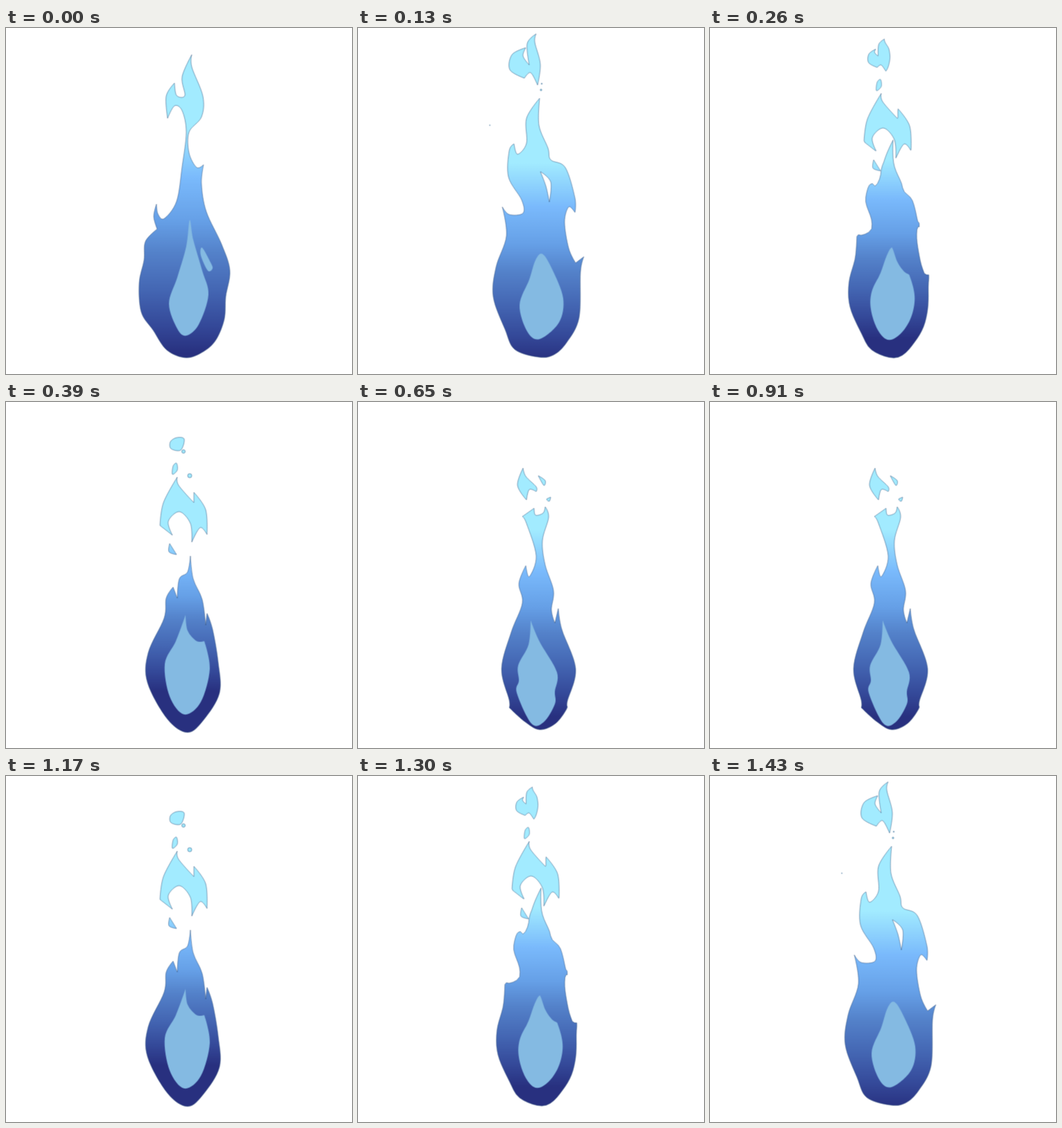
Recreate the animation shown at these times as an HTML page. Size 500 px wide and 500 px high, loop 1560 ms.

```html
<!DOCTYPE html>
<html lang="en">
<head>
<meta charset="utf-8">
<title>Blue flame</title>
<style>
html, body { margin: 0; width: 100%; height: 100%; overflow: hidden; background: #fff; }
svg { display: block; width: 100vw; height: 100vh; }
g { opacity: 0; }
.fire { stroke: #1c3f6e; stroke-width: .8; stroke-opacity: .6; }
.hole { fill: #fff; }
.core { fill: #84bae2; }
</style>
</head>
<body>
<svg viewBox="-.5 -.5 500 500"></svg>
<script>
const STEP = 130;
const LIFT = 14;      // loose pieces rise between key poses
const SAMPLES = 120;  // points per blended outline
const COLORS = {
  0: '#a2ebff', .22: '#7abafc', .41: '#66a0e7', .55: '#5482ca', .72: '#4466b3', .87: '#354a9a', 1: '#28307f'
};

// Key points of smooth closed curves, tip first; "!" is a sharp corner, "|" starts a new outline.
const KEYS = [
  {
    shade: [145, 470],
    body: `268,38! 268,56 284,98 282,128 264,150 264,180 275,201 285,197! 282,225 289,265 311,312 323,350 317,388
      315,420 303,450 285,467 260,476 232,465 212,436 195,410 192,368 199,335 201,308 218,290! 213,272 217,254!
      219,268 228,275 246,250 254,200 260,150 254,119 243,112 233,130! 231,98 243,79! 246,97 258,97 254,70`,
    core: `265,277 270,305 283,350 292,385 278,428 260,444 247,434 235,398 247,360 260,315
      | 283,317 295,338 298,347 291,350 281,328`
  },
  {
    shade: [195, 480],
    body: `262,101! 261,140 274,173 278,190 299,201 313,245 313,266! 304,258 298,280 304,318 314,339! 326,330!
      321,352 319,418 301,454 282,472 260,475 226,464 212,435 195,388 199,345 214,300 208,258! 218,269 238,267
      236,248 217,215 218,177 225,167! 230,182 243,166 243,130`,
    hole: '263,207! 278,222 276,251! 271,228',
    bits: '257,8! 255,20 263,52 259,82! 249,64 240,72! 219,60 222,38 242,28! 238,40 247,53! 244,22',
    core: '266,326 280,348 296,390 290,425 262,449 244,438 233,400 247,363 256,335',
    sparks: [[264, 89, 1.2], [265, 80, .8], [190, 140, .5]]
  },
  {
    shade: [185, 418],
    body: `266,222! 270,255 283,285 288,322! 290,305! 298,328 306,375 308,420 285,459 262,477 233,458 204,405
      205,362 228,312 231,283 241,267! 247,283! 250,255 262,245`,
    bits: `246,51 257,53 252,69 238,67 237,57
      | 247,108! 249,120 271,145! 271,130! 288,155 290,191! 280,181 268,202! 266,175 250,158 234,172 240,192!
        222,178! 227,145
      | 236,204! 246,220! 235,216 | 246,88 247,98 240,104 241,92`,
    core: '259,307! 262,330 275,345 286,345! 294,385 281,433 257,451 236,425 229,378 245,345',
    sparks: [[256, 71, 2.5], [265, 106, 3]]
  },
  {
    shade: [185, 455],
    body: `270,151! 275,166 266,200 270,235 282,272 279,300 284,319! 289,298! 294,328 314,385 302,432 301,443
      285,464 262,473 240,461 218,441! 218,430 207,385 221,332 237,290 232,262 242,236! 247,252 257,222 243,175
      237,165! 254,153! 256,163 267,160`,
    bits: `260,106! 270,113 268,120 | 238,95! 242,107 257,122 257,129! 247,126 243,141! 230,120
      | 272,140 278,137! 276,143`,
    core: '249,315! 262,346 287,390 284,418 284,436 268,462 250,464 229,420 232,402 231,380 246,350'
  }
];

const svg = document.querySelector('svg');
const make = tag => document.createElementNS('http://www.w3.org/2000/svg', tag);

function add(parent, tag, attrs = {}) {
  const el = make(tag);
  for (const key in attrs) el.setAttribute(key, attrs[key]);
  return parent.appendChild(el);
}

function curve(text) {
  const pts = text.trim().split(/\s+/).map(word => {
    const [x, y] = word.replace('!', '').split(',').map(Number);
    return { x, y, sharp: word.endsWith('!') };
  });
  const n = pts.length;
  const handle = (i, sign) => {
    const p = pts[i], a = pts[(i + n - 1) % n], b = pts[(i + 1) % n];
    const k = p.sharp ? 0 : sign / 6;
    return `${p.x + k * (b.x - a.x)},${p.y + k * (b.y - a.y)}`;
  };
  const arcs = pts.map((p, i) => {
    const j = (i + 1) % n;
    return `C${handle(i, 1)} ${handle(j, -1)} ${pts[j].x},${pts[j].y}`;
  });
  return `M${pts[0].x},${pts[0].y}${arcs.join('')}Z`;
}

const curves = text => text ? text.split('|').map(curve) : [];

const build = key => ({
  shade: key.shade,
  body: curves(key.body),
  hole: curves(key.hole),
  bits: curves(key.bits),
  core: curves(key.core),
  sparks: key.sparks || []
});

// Evenly spaced points from the tip down to the lowest point, then back up to the tip.
function trace(d) {
  const path = make('path');
  path.setAttribute('d', d);
  const total = path.getTotalLength();
  const at = s => path.getPointAtLength(s * total);
  let low = 0;
  for (let s = 0; s < 1; s += .005) if (at(s).y > at(low).y) low = s;
  return Array.from({ length: SAMPLES }, (_, i) => {
    const t = 2 * i / SAMPLES;
    return at(t < 1 ? t * low : low + (t - 1) * (1 - low));
  });
}

// Midway outlines; a piece without a partner keeps its shape.
function mix(a, b, lift = 0) {
  return Array.from({ length: Math.max(a.length, b.length) }, (_, i) => {
    const p = trace(a[i] || b[i]), q = trace(b[i] || a[i]);
    return 'M' + p.map((u, k) => `${(u.x + q[k].x) / 2},${(u.y + q[k].y) / 2 - lift}`).join('L') + 'Z';
  });
}

const between = (a, b) => ({
  shade: a.shade.map((y, i) => (y + b.shade[i]) / 2),
  body: mix(a.body, b.body),
  hole: [],
  bits: mix(a.bits, b.bits, LIFT),
  core: mix(a.core, b.core),
  sparks: []
});

const [tall, wide, split, slim] = KEYS.map(build);
const poses = [tall, wide, between(wide, split), split, between(split, slim), slim, between(slim, tall)];
const order = [...poses.keys()];
order.push(...order.slice(1, -1).reverse());

poses.forEach((pose, index) => {
  const group = add(svg, 'g');
  const id = 'shade' + index, fill = `url(#${id})`;
  const [y1, y2] = pose.shade;
  const grad = add(group, 'linearGradient', { id, gradientUnits: 'userSpaceOnUse', x1: 0, x2: 0, y1, y2 });
  for (const at of Object.keys(COLORS).sort((a, b) => a - b)) {
    add(grad, 'stop', { offset: at, 'stop-color': COLORS[at] });
  }

  for (const d of [...pose.bits, ...pose.body]) add(group, 'path', { class: 'fire', fill, d });
  for (const d of pose.hole) add(group, 'path', { class: 'fire hole', d });
  for (const d of pose.core) add(group, 'path', { class: 'core', d });
  for (const [cx, cy, r] of pose.sparks) add(group, 'circle', { class: 'fire', fill, cx, cy, r });

  const frames = [...order, order[0]].map((shown, i) => ({
    offset: i / order.length,
    opacity: shown === index ? 1 : 0,
    easing: 'steps(1, end)'
  }));
  group.animate(frames, { duration: STEP * order.length, iterations: Infinity });
});
</script>
</body>
</html>
```
